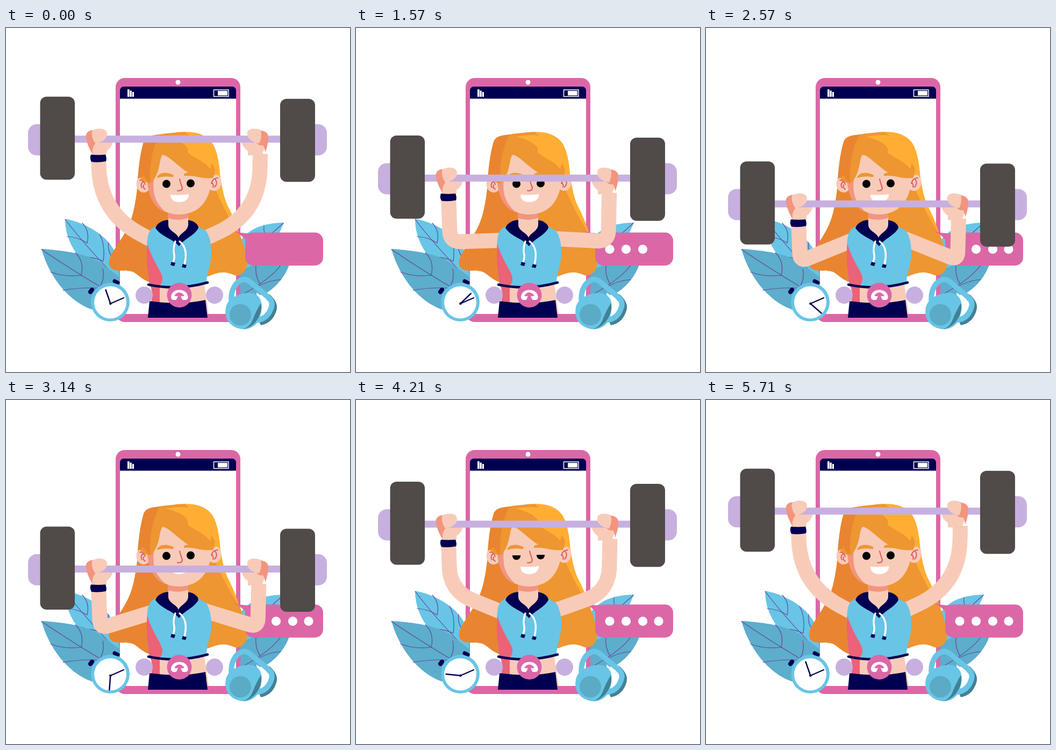
Write an HTML page with a canvas that moves like this. It is 640 px wide and 640 px high and loops after 5.78 s.

```html
<!DOCTYPE html>
<html lang="en">
<head>
<meta charset="utf-8">
<title>Online workout</title>
<style>
html, body { margin: 0; width: 100%; height: 100%; overflow: hidden; background: #fff; }
canvas { display: block; width: 100vw; height: 100vh; }
</style>
</head>
<body>
<canvas id="stage" width="640" height="640"></canvas>
<script>
const ctx = document.getElementById('stage').getContext('2d');
const LOOP = 5780, STEP = LOOP / 81;
const PINK = '#dc67a7', NAVY = '#000051', LILAC = '#c7b0df', IRON = '#504a48';
const SKIN = '#f8cbb9', BLUSH = '#f2957f', RED = '#dc5a63', CORAL = '#ec6277';
const BLUE = '#68c5e5', STEEL = '#5dadcc', TEAL = '#438094', VEIN = '#66469a';
const HAIR = '#ee9631', HAIR_DARK = '#e98530', HAIR_LIGHT = '#ffae33';

const clamp = x => Math.min(1, Math.max(0, x));
const smooth = x => x * x * (3 - 2 * x);
const sine = x => (1 - Math.cos(Math.PI * clamp(x))) / 2;

function fill(color, d) {
  ctx.fillStyle = color;
  ctx.fill(new Path2D(d));
}
function line(color, width, d, cap = 'round') {
  ctx.strokeStyle = color;
  ctx.lineWidth = width;
  ctx.lineCap = cap;
  ctx.lineJoin = 'round';
  ctx.stroke(new Path2D(d));
}
function box(color, x, y, w, h, r = 0) {
  ctx.fillStyle = color;
  ctx.beginPath();
  ctx.roundRect(x, y, w, h, r);
  ctx.fill();
}
function disc(color, x, y, r, ry = r) {
  ctx.fillStyle = color;
  ctx.beginPath();
  ctx.ellipse(x, y, r, ry, 0, 0, 7);
  ctx.fill();
}

function leaves() {
  fill(BLUE, 'M517 362C482 363 454 371 436 396L428 470C470 450 500 405 517 362Z');
  line(VEIN, 1.2, 'M516 363Q485 390 450 425M480 368Q478 380 486 391');
  fill(STEEL, 'M527 440C522 456 508 478 486 492L430 512L432 455Q480 425 527 440Z');
  line(VEIN, 1.2, 'M511 441Q495 465 440 496M511 468Q485 470 466 483M465 441Q463 460 472 475');
}
function leftLeaves() {
  fill(BLUE, 'M110 355C152 363 192 389 204 420Q212 450 211 474C165 460 110 420 110 355Z');
  line(VEIN, 1.2, 'M110 356Q148 406 206 465M142 363Q156 377 151 400M114 388Q134 389 151 400' +
    'M174 384Q185 402 181 434M134 428Q158 423 181 434M191 399Q188 420 204 432');
  fill(STEEL, 'M66 411C110 414 148 420 172 434Q196 452 211 463L211 490L165 525C125 515 82 470 66 411Z');
  line(VEIN, 1.2, 'M66 412Q125 452 190 490M129 418Q146 434 140 460M83 454Q110 464 140 460' +
    'M180 448Q184 468 174 482M106 488Q140 482 174 484');
}

function phone() {
  box(PINK, 204, 93, 232, 454, 17);
  box(NAVY, 212, 109, 216, 30, [7, 7, 0, 0]);
  box('#fff', 212, 131.5, 216, 400.5);
  disc('#fff', 320, 101, 4.5);
  box('#fff', 226, 114, 3.6, 14);
  box('#fff', 230.4, 116.5, 3.4, 11.5);
  box('#fff', 234.8, 119, 3.2, 9);
  ctx.strokeStyle = '#fff';
  ctx.lineWidth = 1.5;
  ctx.strokeRect(386.5, 115, 27.5, 12.5);
  box('#fff', 394, 117, 18, 8.5);
}

function backHair() {
  fill(HAIR, 'M260 207C285 194 370 190 387 225C400 255 397 300 414 335C428 364 442 398 448 428' +
    'C452 446 442 462 425 460C405 451 395 455 376 462L268 473C252 469 246 452 225 452' +
    'C240 400 250 240 260 207Z');
  fill(HAIR_DARK, 'M257 210C246 240 248 300 236 345C226 385 198 410 192 432' +
    'C189 450 203 453 224 451C240 449 246 466 268 473L265 400L302 372V340L272 220Z');
  fill(HAIR_LIGHT, 'M384 220C398 245 397 297 412 330Q426 356 433 381C416 357 400 325 385 290Z');
}

function bubble(t) {
  fill(PINK, 'M421 377Q438 383 460 382L452 404Q442 385 421 377Z');
  box(PINK, 445, 380.5, 145, 61.5, 15);
  [472, 502.5, 533.5, 563].forEach((x, i) => {
    ctx.globalAlpha = clamp((t - 190 - i * 570) / 250);
    disc('#fff', x, 411.5, 8.6);
    ctx.globalAlpha = 1;
  });
}

// Wrist to shoulder with a bend that sharpens as the weight comes down.
function arm(wx, wy, ex, ey, sx, sy, bend) {
  const toward = (x, y) => {
    const k = bend / Math.hypot(x - ex, y - ey);
    return `${ex + (x - ex) * k} ${ey + (y - ey) * k}`;
  };
  line(SKIN, 28, `M${wx} ${wy}L${toward(wx, wy)}Q${ex} ${ey} ${toward(sx, sy)}L${sx} ${sy}`, 'butt');
}
function arms(drop) {
  const bump = 7 * Math.sin(Math.PI * clamp(drop / 72));
  const bend = 14 + 71 * Math.exp(-drop / 30);
  arm(172, 236 + drop, 175, 343 + 0.76 * drop - bump, 272, 395, bend);
  arm(473 - drop / 40, 234 + drop, 471 - drop / 40, 345 + 0.72 * drop - bump, 369, 392, bend);
}

function torso() {
  fill(SKIN, 'M285 478L368 470L377 532L285 532Z');
  fill(CORAL, 'M268 478H286V510H270Q275 495 268 478Z');
  fill(BLUE, 'M281 368C266 374 263 381 262 410Q262 450 267 478Q320 488 373 474' +
    'C374 450 383 440 382 413Q381 390 372 377L356 369Z');
  fill(CORAL, 'M263 402C260 425 263 450 267 478L286 480Q292 472 291 464C287 448 276 440 263 402Z');
  line(NAVY, 4.6, 'M265 477.5Q320 489 375 473.5');
  fill(NAVY, 'M267 508Q325 516 371 506L375 539H264Z');
  fill(NAVY, 'M278 372C282 361 294 357 304 357H337C349 358 358 365 358 372' +
    'C350 387 331 392 322 406C311 392 289 389 278 372Z');
  fill(SKIN, 'M301.500 335H339V366C338 378 326 380 321 390C317 380 303 378 302 367Z');
  fill(BLUSH, 'M301.500 335H339V353Q322 360 301.500 354Z');
  line('#fff', 3.4, 'M315 397Q310 411 313 422Q314 430 310 437M323 397C336 407 336 424 332 440');
  fill(NAVY, 'M308 435L315 437L313 443L306 441Z');
  fill(NAVY, 'M329 439L336 441L334 446.500L327 445Z');
}

function face(lid) {
  disc(SKIN, 256, 290, 13.5, 16);
  disc(SKIN, 387, 287, 13.5, 16);
  fill(SKIN, 'M262 230H384V268C382 322 360 347 320 347C280 345 263 315 262 270Z');
  fill(BLUSH, 'M262 270C262 316 278 337 298 343C277 325 271 307 276 275Z');
  line(RED, 2, 'M249 283Q256 282 259 291M259 284Q248 289 253 297M256 292Q254 297 259 300');
  line(RED, 2, 'M394 279Q385 279 382 289M389 281Q395 289 388 296M383 288Q387 292 385 296');

  // Fringe
  fill(HAIR, 'M257 210C266 197 290 198 318 194C360 190 385 203 391 232Q394 260 385 279' +
    'Q362 281 346 273C322 261 303 236 291 236C284 244 288 272 269 289Q256 289 247 276Q250 230 257 210Z');
  fill(HAIR_DARK, 'M285 199C267 199 259 203 256 212Q248 238 245 281L256 274Q261 284 269 289Q267 280 269 255Q272 225 285 199Z');
  fill(HAIR_LIGHT, 'M298 202Q318 198 341 200L333 194C365 191 387 208 393 237Q398 259 398 274' +
    'Q394 270 387 275L389 263L383 251L380 262C366 245 343 239 338 231Q339 224 337 222C329 211 315 207 298 202Z');

  fill(HAIR, 'M281 279C283 268 301 267 312 274Q312 278 307 277Q293 275 281 279Z');
  fill(HAIR, 'M331 275C330 268 340 268 356 272L358 277Q341 274 331 275Z');
  ctx.save();
  ctx.beginPath();
  ctx.rect(280, 281 + 15 * lid, 80, 30);
  ctx.clip();
  disc('#000', 298.5, 290, 7.5);
  disc('#000', 343.5, 289, 7.5);
  ctx.restore();
  if (lid > 0) line('#000', 1.6, `M291.500 ${282 + 14 * lid}h14M336.500 ${281 + 14 * lid}h14`);
  line(RED, 2, 'M323 281Q325 290 328 297Q328 304 319 302.500');
  fill('#fff', 'M306 310Q324 312 340 309C341 319 331 324 322 324C313 324 306 319 306 310Z');
}

function gauge() {
  disc(LILAC, 257, 497, 16);
  disc(LILAC, 388, 497, 16);
  disc(PINK, 322.5, 497, 23);
  fill('#fff', 'M307 500C308 483 337 483 338.500 500Q339 506 333 506H313Q307 506 307 500Z');
  fill(PINK, 'M313 498Q322 486 332 498Q327 500 325 498Q326 503 330 508H315Q319 503 320 498Q317 500 313 498Z');
}

function watch(t) {
  line(NAVY, 8, 'M157 491L160 487');
  line(NAVY, 7, 'M202 471L208 474');
  disc(BLUE, 194, 510, 36);
  disc('#fff', 194, 510.5, 30);
  const a = (-19 + 360 * smooth(t / LOOP)) * Math.PI / 180;
  line(NAVY, 2.5, `M194.300 512.700l${27 * Math.sin(a)} ${-27 * Math.cos(a)}`);
  line(NAVY, 2.3, 'M194.300 512.700L219 502');
  disc(NAVY, 194.3, 512.7, 2.2);
}

function kettlebell() {
  fill(TEAL, 'M490 495Q508 511 503 526Q496 549 474 553L468 540Z');
  fill('#fff', 'M466 492L488 508Q498 519 491 531Q484 542 470 541Z');
  line(BLUE, 10, 'M420 512C416 486 429 472 439 468.500Q446 466 455 473L488 501Q497 509 494 519C489 535 480 542 468 543');
  fill(BLUE, 'M409 520C413 500 440 491 456 493C477 496 480 517 471 542C464 558 447 562 437 560C416 556 405 540 409 520Z');
  fill(TEAL, 'M474 512C479 528 466 556 441 560.500Q453 556 458 545Q465 527 474 512Z');
  disc('#5babc6', 436, 533.5, 20);
}

function palm() {
  fill(SKIN, 'M150 207L199 211Q197 222 187 229V237H161Q157 226 150 207Z');
}
function fingers() {
  fill(BLUSH, 'M163 190C151 190 147 197 149 206Q152 220 161 235Q159 223 167 214Z');
  fill(SKIN, 'M160 192C165 186 185 185 187.500 194C190 204 182 212 166 214.500Q158 203 160 192Z');
}
function rightFingers() {
  fill(BLUSH, 'M466 190Q487 190 488 202Q488 218 482 232Q482 224 478 218Q472 220 466 214Z');
  fill(SKIN, 'M474 190C466 186 451 186 449 194C447 205 458 213 471 214.500Q477 203 474 190Z');
}
function mirrored(part) {
  ctx.save();
  ctx.translate(637, 0);
  ctx.scale(-1, 1);
  part();
  ctx.restore();
}

function barbell(drop) {
  ctx.save();
  ctx.translate(0, drop);
  palm();
  mirrored(palm);
  box(LILAC, 120, 200.3, 400, 13);
  box(LILAC, 41, 179, 40, 58, 16);
  box(LILAC, 557, 179, 40, 58, 16);
  box(IRON, 63.5, 127.700, 64.5, 154.600, 12);
  box(IRON, 510, 131.700, 65, 154.600, 12);
  fingers();
  rightFingers();
  fill(NAVY, 'M158 235.500Q172 237 185 235.500Q188 243 186 248Q172 251 159 249Q155 242 158 235.500Z');
  ctx.restore();
}

function draw(t) {
  const down = sine((t - 140) / 2540), up = sine((t - 2670) / 2185);
  const drop = 121 * (down - up);
  const lid = Math.max(...[4280, 5350].map(at => clamp(1.05 - Math.abs(t - at) / 140)));
  ctx.fillStyle = '#fff';
  ctx.fillRect(0, 0, 640, 640);
  leaves();
  phone();
  leftLeaves();
  backHair();
  bubble(t);
  arms(drop);
  torso();
  face(lid);
  gauge();
  watch(t);
  kettlebell();
  barbell(drop);
}

const start = performance.now();
function tick() {
  const t = (performance.now() - start) % LOOP;
  draw(Math.floor((t + 5) / STEP) % 81 * STEP);
  requestAnimationFrame(tick);
}
tick();
</script>
</body>
</html>
```
